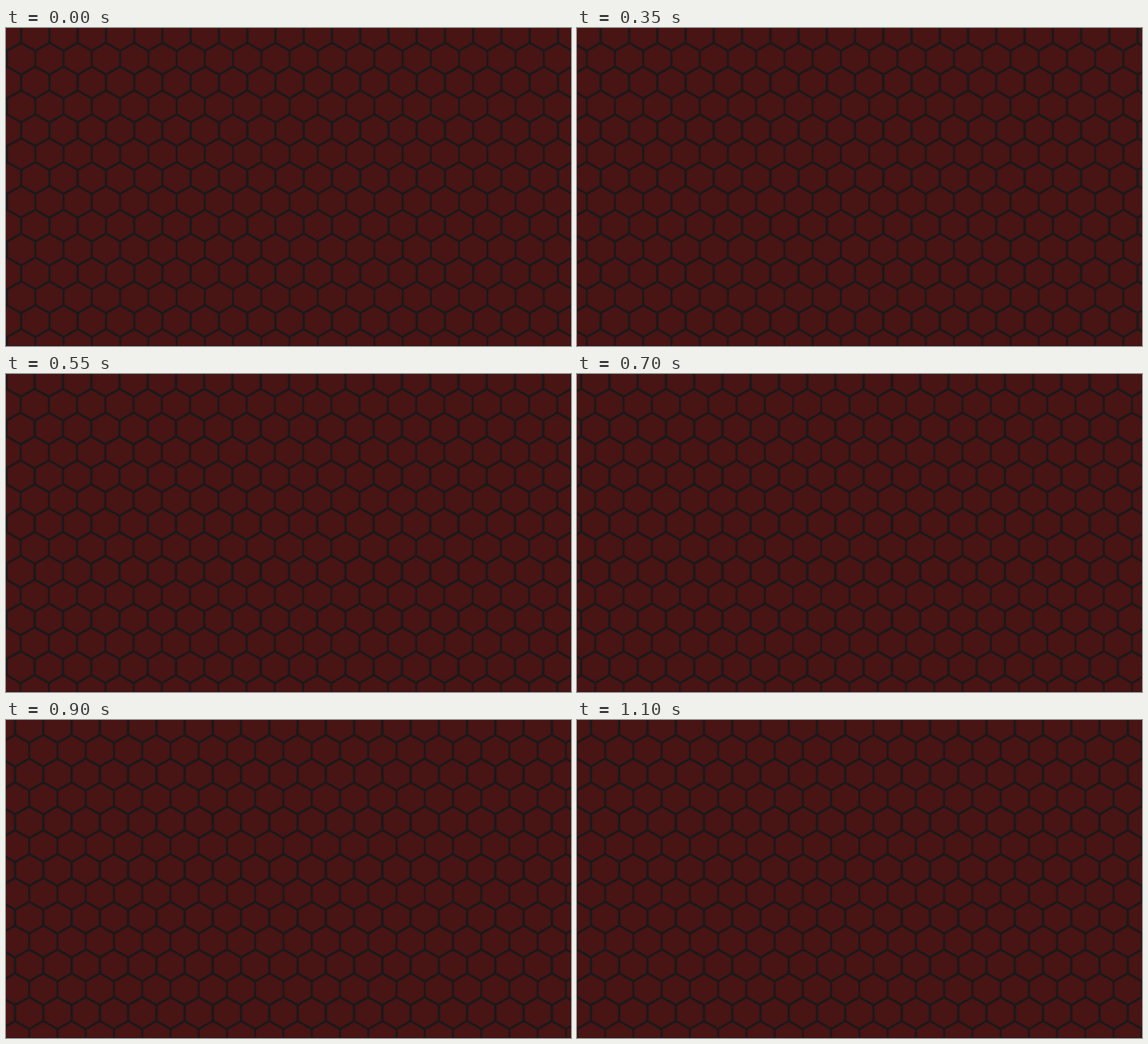
Recreate the animation shown at these times as an HTML page. Size 998 by 561 pixels, loop 1.15 s.

```html
<!DOCTYPE html>
<html lang="en">
<head>
<meta charset="utf-8">
<title>Sliding honeycomb</title>
<style>
  html, body { margin: 0; width: 100%; height: 100%; overflow: hidden; background: #481414; }
  svg { display: block; width: 998px; height: 561px; }
  path { fill: none; stroke: #1a191b; stroke-linejoin: miter; }
  #grid { animation: slide 1150ms steps(23, end) infinite; }
  #wide { stroke-width: 4; }
  #thin { stroke-width: 3.2; }
  #zigzag { stroke-width: 3.7; }
  .edge { fill: #1a191b; }
  @keyframes slide {
    from { transform: translateX(0); }
    to { transform: translateX(49.9px); }
  }
</style>
</head>
<body>
<svg viewBox="0 0 998 561">
  <g id="grid">
    <path id="zigzag"/>
    <path id="wide"/>
    <path id="thin"/>
  </g>
  <rect class="edge" y="560" width="998" height="1" opacity=".5"/>
  <rect class="edge" x="997" width="1" height="561" opacity=".25"/>
</svg>
<script>
  const cellW = 49.9, rowH = 42.08, side = rowH / 3;
  const startX = 26.9 - 2 * cellW, startY = 54.1, columns = 23;
  let wide = '', thin = '', zigzag = '';

  for (let row = -1; row <= 12; row++) {
    const shifted = row % 2 === 0;
    const cy = startY + row * rowH;
    const x0 = startX - (shifted ? cellW / 2 : 0);
    for (let col = 0; col < columns; col++) {
      const x = x0 + col * cellW;
      const stem = `M${x} ${cy - side}V${cy + side}`;
      if (shifted) thin += stem; else wide += stem;
      zigzag += `${col ? 'L' : 'M'}${x} ${cy + side}L${x + cellW / 2} ${cy + 2 * side}`;
    }
  }

  const setPath = (id, d) => document.getElementById(id).setAttribute('d', d);
  setPath('wide', wide);
  setPath('thin', thin);
  setPath('zigzag', zigzag);
</script>
</body>
</html>
```
